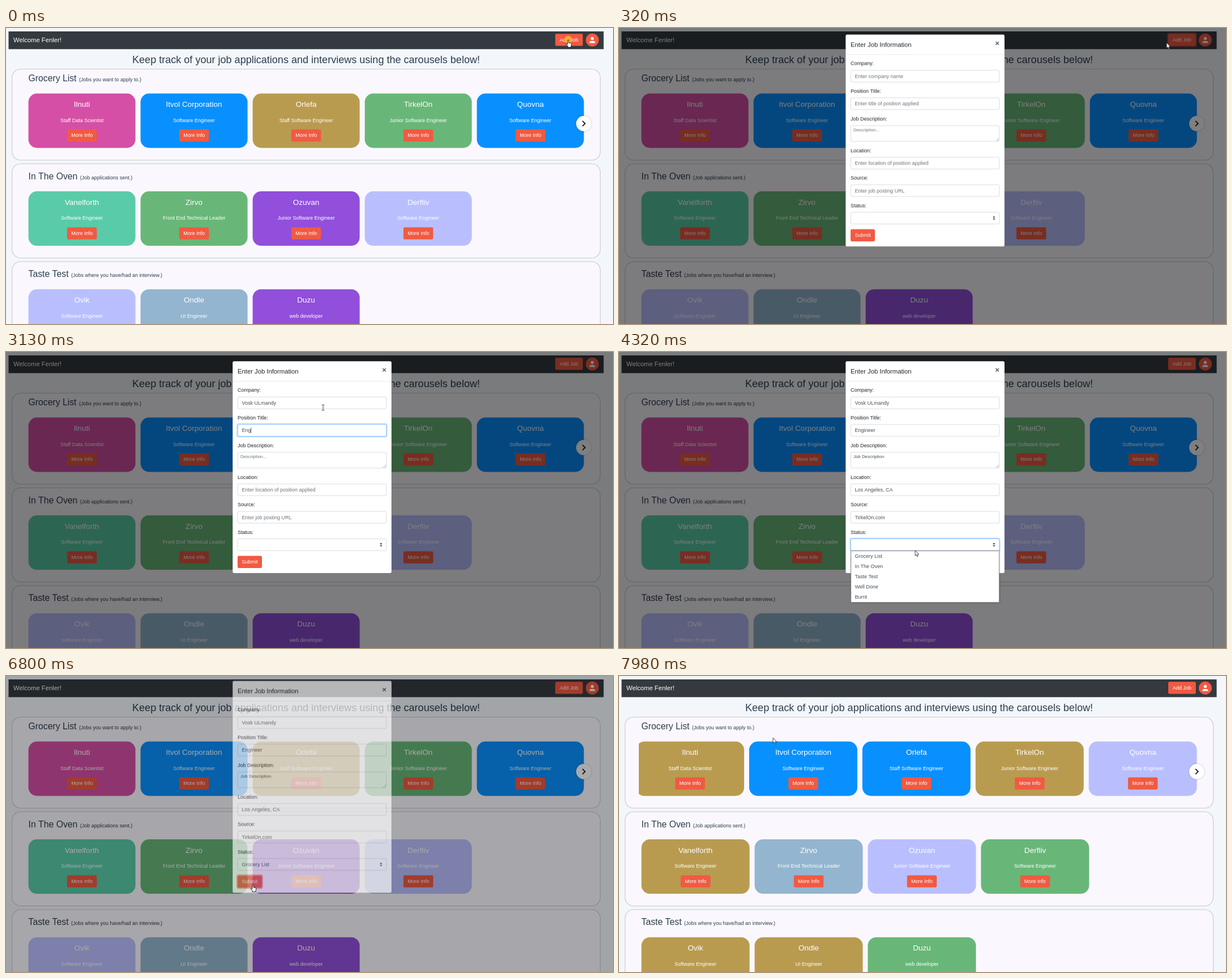
An HTML page with a canvas for the animation above (8000 ms loop, 1072x522 px).

```html
<!DOCTYPE html>
<html lang="en">
<head>
<meta charset="utf-8">
<title>Job tracker</title>
<style>
  html, body { margin: 0; width: 100%; height: 100%; overflow: hidden; background: #f3f7fb; }
  canvas { display: block; }
</style>
</head>
<body>
<canvas id="stage" width="1072" height="522"></canvas>
<script>
const stage = document.getElementById('stage').getContext('2d');
const dialog = new OffscreenCanvas(1072, 522).getContext('2d');
let ctx = stage;
const LOOP = 8000;
const ORANGE = '#f15a42', INK = '#2c3e50';
const PINK = '#d54fa6', BLUE = '#0990ff', GOLD = '#b99b50', GREEN = '#68b778',
      TEAL = '#5acba8', PURPLE = '#914fdb', LILAC = '#b9bffe', STEEL = '#93b5cf';

// Each job: company, role, colour before and after the reload.
const lists = [
  { title: 'Grocery List', note: '(Jobs you want to apply to.)', top: 72.5, bottom: 233, jobs: [
    ['Ilnuti', 'Staff Data Scientist', PINK, GOLD],
    ['Itvol Corporation', 'Software Engineer', BLUE, BLUE],
    ['Orlefa', 'Staff Software Engineer', GOLD, BLUE],
    ['TirkelOn', 'Junior Software Engineer', GREEN, GOLD],
    ['Quovna', 'Software Engineer', BLUE, LILAC]] },
  { title: 'In The Oven', note: '(Job applications sent.)', top: 239.5, bottom: 405.5, jobs: [
    ['Vanelforth', 'Software Engineer', TEAL, GOLD],
    ['Zirvo', 'Front End Technical Leader', GREEN, STEEL],
    ['Ozuvan', 'Junior Software Engineer', PURPLE, LILAC],
    ['Derfliv', 'Software Engineer', LILAC, GREEN]] },
  { title: 'Taste Test', note: '(Jobs where you have/had an interview.)', top: 412, bottom: 578, jobs: [
    ['Ovik', 'Software Engineer', LILAC, GOLD],
    ['Ondle', 'UI Engineer', STEEL, GOLD],
    ['Duzu', 'web developer', PURPLE, GREEN]] }
];

// Label, placeholder, top, height, value, moments at which each character appears.
const fields = [
  ['Company:', 'Enter company name', 79, 21.4, 'Vosk ULmandy',
    [490, 490, 1040, 1190, 1420, 1590, 1670, 1740, 1890, 1970, 2050, 2200]],
  ['Position Title:', 'Enter title of position applied', 127.5, 21.4, 'Engineer',
    [2740, 2910, 3060, 3140, 3140, 3210, 3380, 3450]],
  ['Job Description:', 'Description...', 176.5, 28.5, 'Job Description', [3760, 3760, 3760]],
  ['Location:', 'Enter location of position applied', 232.3, 21.4, 'Los Angeles, CA', []],
  ['Source:', 'Enter job posting URL', 280.7, 21.4, 'TirkelOn.com', []],
  ['Status:', '', 329.2, 21.4, 'Grocery List', []]
];
const filledAt = [2200, 3450, 3850, 4230, 4230, 5330];
const focusFrom = [[490, 0], [2350, 1], [3680, 2], [4230, 5], [6260, 6]];
const options = ['Grocery List', 'In The Oven', 'Taste Test', 'Well Done', 'Burnt'];

// Moving passages are shown in even steps: start, end, number of steps.
const bursts = [[0, 490, 6], [4230, 4550, 4], [5330, 5880, 7], [6800, 7050, 3], [7430, 7980, 7]];
const pointerPath = [[0, 993, 21], [160, 990, 22], [327, 967, 26], [490, 560, 98], [4230, 560, 98],
  [4310, 523, 350], [4390, 521, 353], [4550, 518, 359], [5330, 518, 359], [5880, 436, 367],
  [7430, 436, 368], [7980, 272, 109]];
const OPEN = 135, CLOSE = 6750, GONE = 6950, RELOAD = 7500, READY = 7660;

const ramp = (t, from, length) => Math.max(0, Math.min(1, (t - from) / length));
const easeOut = p => 1 - (1 - p) ** 1.75;

function held(t) {
  for (const [a, b, n] of bursts) {
    if (t >= a && t <= b) return a + (b - a) / n * Math.min(n, Math.floor((t - a + 10) / ((b - a) / n)));
  }
  return t;
}

function pointerAt(t) {
  const next = pointerPath.findIndex(key => key[0] > t);
  if (next < 0) return pointerPath.at(-1).slice(1);
  const [a, ax, ay] = pointerPath[next - 1], [b, bx, by] = pointerPath[next];
  const p = (t - a) / (b - a);
  return [ax + (bx - ax) * p, ay + (by - ay) * p];
}

function text(str, x, y, size, color, align = 'left', weight = '') {
  ctx.font = `${weight} ${size}px "Liberation Sans", Arial, sans-serif`;
  ctx.fillStyle = color;
  ctx.textAlign = align;
  ctx.fillText(str, x, y);
  return ctx.measureText(str).width;
}

function box(x, y, w, h, r, fill, stroke, line = 0.8) {
  ctx.beginPath();
  ctx.roundRect(x, y, w, h, r);
  if (fill) { ctx.fillStyle = fill; ctx.fill(); }
  if (stroke) { ctx.strokeStyle = stroke; ctx.lineWidth = line; ctx.stroke(); }
}

function disc(x, y, r, fill) {
  ctx.beginPath();
  ctx.arc(x, y, r, 0, 7);
  ctx.fillStyle = fill;
  ctx.fill();
}

function shape(path, x, y, fill, stroke, line = 1) {
  ctx.save();
  ctx.translate(x, y);
  const p = new Path2D(path);
  if (fill) { ctx.fillStyle = fill; ctx.fill(p); }
  if (stroke) { ctx.strokeStyle = stroke; ctx.lineWidth = line; ctx.stroke(p); }
  ctx.restore();
}

function button(label, x, y, w, focused) {
  if (focused) box(x - 1, y - 1, w + 2, 23.4, 3, null, 'rgba(241,90,66,.5)', 2);
  box(x, y, w, 21.4, 2.3, ORANGE);
  text(label, x + w / 2, y + 13.6, 9, '#fff', 'center');
}

function card([company, role, before, after], x, y, w, reloaded) {
  const mid = x + w / 2;
  box(x, y, w, 96, 15, reloaded ? after : before);
  text(company, mid, y + 23.7, 13.5, '#fff', 'center');
  text(role, mid, y + 50.2, 9, '#fff', 'center');
  button('More Info', mid - 26.2, y + 63.3, 52.5);
}

function drawPage(t, h) {
  const loading = h >= RELOAD && h < READY;
  const reloaded = h >= READY;
  const extra = loading ? 9.6 : 0;
  const width = reloaded ? 191 : 189, pitch = reloaded ? 199.9 : 198;
  const slide = reloaded ? -9.6 : h >= GONE ? 9.4 : 0;

  ctx.fillStyle = '#f3f7fb';
  ctx.fillRect(0, 0, 1072, 522);
  ctx.fillStyle = '#343a40';
  ctx.fillRect(4.5, 6, 1051 + extra, 31.3);
  text('Welcome Fenler!', 13, 25.2, 11.25, '#fff');
  button('Add Job', 970 + extra, 10.2, 48.7, t >= 80 && t < 490);
  disc(1035.4 + extra, 21.2, 11.5, ORANGE);
  disc(1035.4 + extra, 18.4, 2.7, '#fff');
  shape('M-5 5 v-1.2 c0-3.2 10-3.2 10 0 V5z', 1035.4 + extra, 21.4, '#fff');
  text('Keep track of your job applications and interviews using the carousels below!',
    530 + extra / 2, 62, 18.06, INK, 'center');

  lists.forEach(({ title, note, top, bottom, jobs }, i) => {
    const y = 172.6 * i, shift = i ? 0 : slide;
    box(10.7, top, 1038.8 + extra, bottom - top, 15, '#faf8fe', '#c9c9ce', 1.1);
    const w = text(title, 39.6, 94 + y, 15.75, INK);
    text(note, 39.6 + w + 4.4, 94 + y, 9, INK);
    if (loading) return;
    ctx.save();
    ctx.beginPath();
    ctx.rect(35, 0, 990, 522);
    ctx.clip();
    if (shift > 0) box(39.6 + shift - pitch, 115.5, width, 96, 15, TEAL);
    jobs.forEach((job, n) => card(job, 39.6 + shift + pitch * n, 115.5 + y, width, reloaded));
    ctx.restore();
  });

  if (!loading) {
    ctx.save();
    ctx.shadowColor = 'rgba(0,0,0,.25)';
    ctx.shadowBlur = 3;
    disc(1020.3, 168.5, 13.4, '#fff');
    ctx.restore();
    shape('M-2.2 -4.6 L2.4 0 L-2.2 4.6', 1020.3, 168.5, null, '#222', 1.9);
  }
  if (h >= GONE && h < RELOAD) {
    ctx.fillStyle = '#000';
    ctx.fillRect(0, 516, 359, 6);
    text('Processing request...', 2, 524.5, 7, '#fff');
  }
}

function drawField([label, hint, y, h, value, times], i, t, focused) {
  const area = i === 2, size = area ? 7.9 : 9;
  const x = area ? 414 : 416.5, base = y + (area ? 10.7 : 13.8);
  text(label, 409, y - 8.6, 9, '#212529');
  if (focused) box(408.3, y - 0.7, 264.2, h + 1.4, 3, null, 'rgba(0,123,255,.28)', 2);
  box(409.3, y + 0.3, 262.4, h - 0.6, 2.3, '#fff', focused ? '#80bdff' : '#ced4da');

  const count = t >= filledAt[i] ? value.length : times.filter(at => t >= at).length;
  const typed = value.slice(0, count);
  const w = text(typed || hint, x, base, size, typed ? '#495057' : '#6c757d');
  if (focused && i < 5) {
    ctx.fillStyle = '#333';
    ctx.fillRect(x + (typed ? w : 0), base - size + 0.8, 0.7, size + 1);
  }
  if (area) shape('M-5 0 L0 -5 M-2 0 L0 -2', 671, y + h - 1, null, '#777', 0.6);
  if (i === 5) shape('M-2.3 -.8 L0 -3.4 L2.3 -.8z M-2.3 .8 L0 3.4 L2.3 .8z', 662.3, y + 10.7, '#343a40');
}

function drawDialog(t) {
  const focus = focusFrom.reduce((last, [at, i]) => t >= at ? i : last, -1);
  ctx = dialog;
  ctx.clearRect(0, 0, 1072, 522);
  box(400.2, 16.3, 280.7, 373.6, 2.7, '#fff', 'rgba(0,0,0,.2)', 0.5);
  text('Enter Job Information', 409, 37.8, 11.25, '#212529');
  text('×', 668, 36.2, 13, '#555', 'center', 'bold');
  ctx.fillStyle = '#dee2e6';
  ctx.fillRect(400.5, 51.2, 280, 0.7);
  fields.forEach((field, i) => drawField(field, i, t, focus === i));
  button('Submit', 409, 359.6, 43, focus === 6);
  ctx = stage;
}

function drawOptions(h) {
  ctx.save();
  ctx.shadowColor = 'rgba(0,0,0,.3)';
  ctx.shadowBlur = 3;
  box(409.5, 350.6, 262, 91, 0, '#fff', '#777', 0.7);
  ctx.restore();
  options.forEach((option, i) => {
    const hot = i === 0 && h >= 4460;
    if (hot) box(410, 351, 261, 17.8, 0, '#1967d2');
    text(option, 416.5, 363.2 + 18 * i, 9, hot ? '#fff' : '#495057');
  });
}

// Backdrop and dialog fade together while the dialog slides.
function drawModal(t, h) {
  const lift = 1 - easeOut(ramp(h, OPEN, 300)) + easeOut(ramp(h, CLOSE, 300));
  drawDialog(t);
  ctx.globalAlpha = ramp(h, OPEN, 150) - ramp(h, CLOSE, 150);
  ctx.fillStyle = 'rgba(0,0,0,.5)';
  ctx.fillRect(0, 0, 1072, 522);
  ctx.drawImage(dialog.canvas, 0, -28 * lift);
  ctx.globalAlpha = 1;
  if (t >= 4310 && t < 5330) drawOptions(h);
}

function drawPointer(t, h) {
  const [x, y] = pointerAt(h);
  if (t < 80) disc(993, 20.5, 6.8, 'rgba(250,176,40,.92)');
  if (t < 160 || (h > 5700 && h < GONE && x < 452)) {
    shape('M-1 .8 C-1 -.5 1 -.5 1 .8 V5 L4.6 5.8 Q6 6.2 5.8 7.6 L5 11 V13 H-.8 V11.4 L-3.6 7.6 C-4 6.4 -2.6 6.2 -1 8z',
      x, y, '#fff', '#111', 0.9);
  } else if (h > 480 && h < 4230) {
    shape('M-2.4 -4.8 H-.7 L0 -4.2 L.7 -4.8 H2.4 M0 -4.2 V4.2 M-2.4 4.8 H-.7 L0 4.2 L.7 4.8 H2.4', x, y, null, '#333', 0.9);
  } else {
    shape('M0 0 V9.4 L2.1 7.5 L3.6 10.8 L5.1 10.1 L3.7 7 H6.6z', x, y, '#fff', '#222', 0.8);
  }
}

function draw(now) {
  const t = now % LOOP, h = held(t);
  drawPage(t, h);
  if (h > OPEN && h < GONE) drawModal(t, h);
  drawPointer(t, h);
  requestAnimationFrame(draw);
}
requestAnimationFrame(draw);
</script>
</body>
</html>
```
